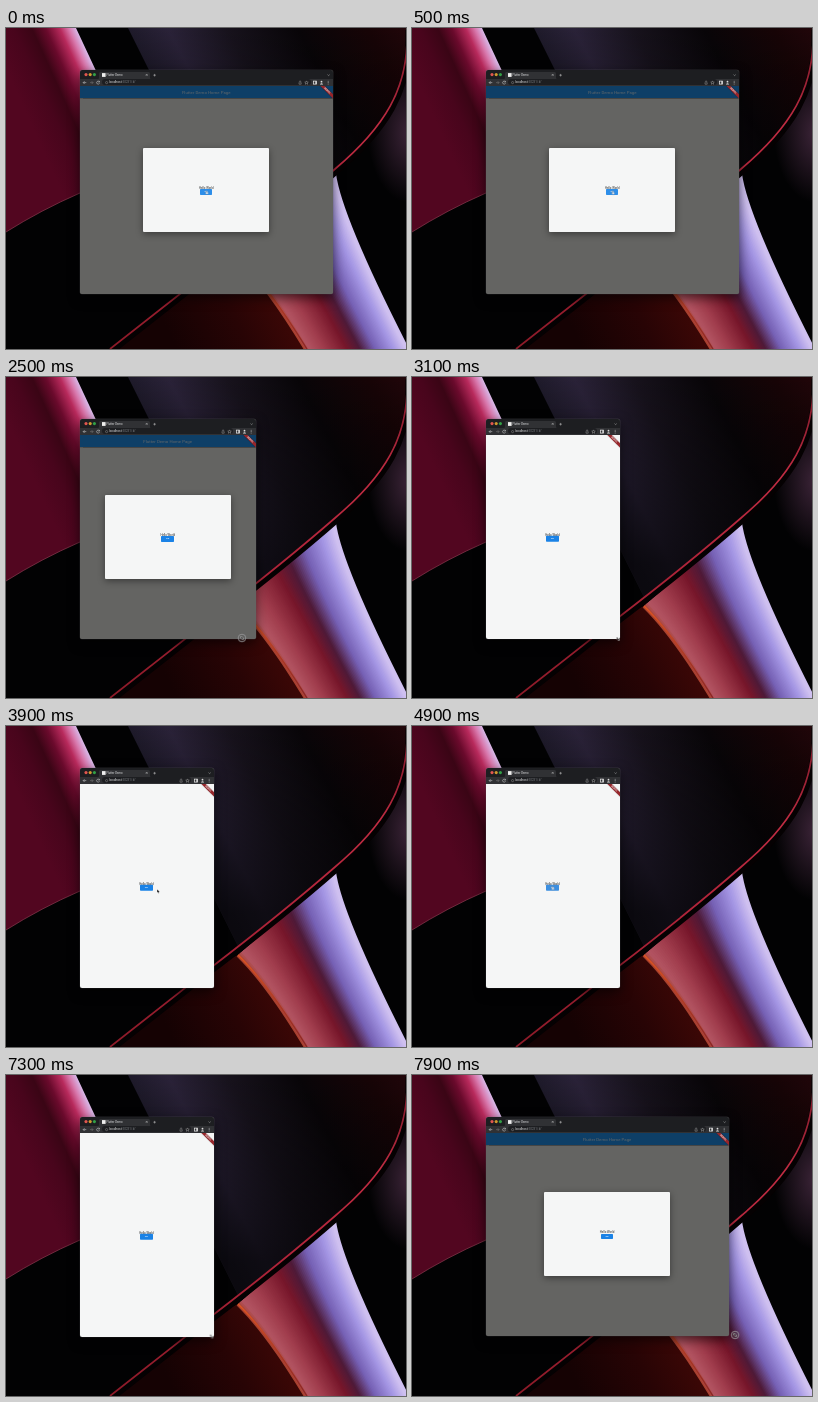
An HTML page for the animation above (8000 ms loop, 400 by 321 pixels).

```html
<!DOCTYPE html>
<html lang="en">
<head>
<meta charset="utf-8">
<title>Resizing a dialog</title>
<style>
html, body { margin: 0; width: 100%; height: 100%; overflow: hidden; background: #000; }
body { position: relative; font-family: Roboto, Arial, sans-serif; }
.wall { position: absolute; left: 0; top: 0; width: 400px; height: 321px; }

.window {
  position: absolute; left: 73.5px; top: 41.5px; width: 253.5px; height: 224.5px;
  border-radius: 2.5px; overflow: hidden; background: #646462;
  animation: resize 8s linear infinite;
}
.shade { overflow: visible; background: none; box-shadow: 0 4px 12px rgba(0,0,0,.6), 0 0 0 .5px rgba(120,120,125,.3); }
@keyframes resize {
  0%, 21.25% { width: 253.5px; height: 224.5px; }
  31.25% { width: 176.5px; height: 220.5px; }
  36.25%, 91.9% { width: 134px; height: 220.8px; }
  98.75% { width: 243px; height: 219.5px; }
  100% { width: 253px; height: 219.5px; }
}

.tabs { position: absolute; left: 0; right: 0; top: 0; height: 9px; background: #1d1e21; }
.bar { position: absolute; left: 0; right: 0; top: 9px; height: 7.2px; background: #303134; }
.pill { position: absolute; left: 22.5px; right: 22.5px; top: .9px; height: 5.4px; border-radius: 3px; background: #1d1e21; }
.url { position: absolute; left: 29.5px; top: 1.4px; font-size: 3.1px; line-height: 4.4px; color: #e4e5e7; white-space: nowrap; }
.url span { color: #777a7e; }
.tabs svg, .bar svg { position: absolute; top: 0; height: 9px; }
.tabs .left, .bar .left { left: 0; width: 90px; }
.tabs .right, .bar .right { right: 0; width: 40px; }
.tabs b { position: absolute; left: 27px; top: 3.5px; font: 2.8px/5px Roboto, Arial, sans-serif; color: #e6e7e9; white-space: nowrap; }

.page { position: absolute; left: 0; right: 0; top: 16.2px; bottom: 0; background: #646462; container-type: inline-size; overflow: hidden; }
.appbar {
  position: absolute; left: 0; right: 0; top: 0; height: 12.6px; background: #0e3f67;
  color: #63686b; font-size: 4.35px; line-height: 13.5px; text-align: center; white-space: nowrap;
  box-shadow: 0 .6px 1px rgba(0,0,0,.3);
}
.dialog {
  position: absolute; left: 50%; top: 50%; width: 126px; height: 84px; transform: translate(-50%, -50%);
  background: #f5f6f6; border-radius: 1px; box-shadow: 0 2px 7px rgba(0,0,0,.42);
  display: flex; flex-direction: column; align-items: center; justify-content: center;
}
@container (max-width: 160px) {
  .dialog { width: 100%; height: 100%; border-radius: 0; box-shadow: none; }
}
.dialog p { position: relative; top: .9px; margin: 0; font-size: 2.85px; line-height: 4.2px; color: #222; }
.dialog button {
  width: 12.4px; height: 5.8px; margin: 0; padding: 1px 0 0; border: 0; border-radius: .7px; box-sizing: border-box;
  background: #1a82e6; color: #fff; font: 500 2.5px/4.8px Roboto, Arial, sans-serif;
  animation: hover 8s step-end infinite;
}
@keyframes hover {
  0% { background: #2d8ee9; }
  7.5% { background: #1a82e6; }
  57.5% { background: #3c8fe0; }
  81.5%, 100% { background: #1a82e6; }
}
.banner {
  position: absolute; right: -6px; top: 3.2px; width: 24px; height: 3.2px; transform: rotate(45deg);
  background: #97262b; color: #f0e8e8; font: 700 2.4px/3.2px Roboto, Arial, sans-serif; text-align: center;
  box-shadow: 0 0 1px rgba(0,0,0,.4);
}

.cursor { position: absolute; left: 0; top: 0; width: 0; height: 0; animation: travel 8s ease-in-out infinite; }
.cursor svg { position: absolute; left: -6px; top: -6px; width: 12px; height: 12px; overflow: visible; }
@keyframes travel {
  0%, 6% { transform: translate(200.5px, 164px); }
  15%, 21.25% { transform: translate(329.5px, 267px); animation-timing-function: linear; }
  31.25% { transform: translate(236px, 261px); animation-timing-function: linear; }
  35.5%, 40% { transform: translate(206px, 262px); }
  47%, 50% { transform: translate(152px, 165px); }
  58%, 80% { transform: translate(140.5px, 161.5px); }
  88.75%, 91.3% { transform: translate(205.5px, 261.5px); animation-timing-function: linear; }
  98.75% { transform: translate(323px, 260px); animation-timing-function: linear; }
  100% { transform: translate(333px, 260px); }
}
.hand, .arrow, .grip, .ring { opacity: 0; animation: 8s step-end infinite; }
.hand { animation-name: hand; }
.arrow { animation-name: arrow; }
.grip { animation-name: grip; }
.ring { animation-name: ring; }
@keyframes hand { 0%, 57.5% { opacity: 1; } 7.5%, 81.5%, 100% { opacity: 0; } }
@keyframes arrow { 0%, 14.5%, 57.5%, 88%, 100% { opacity: 0; } 7.5%, 41%, 81.5% { opacity: 1; } }
@keyframes grip { 0%, 41%  { opacity: 0; } 14.5%, 88%, 100% { opacity: 1; } }
@keyframes ring { 0%, 37% { opacity: 0; } 20.5%, 91.9%, 100% { opacity: 1; } }
</style>
</head>
<body>
<svg class="wall" viewBox="0 0 400 321">
  <defs>
    <linearGradient id="crimson" gradientUnits="userSpaceOnUse" x1="6" y1="54" x2="79" y2="21">
      <stop offset="0" stop-color="#520620"/><stop offset=".3" stop-color="#48051c"/><stop offset=".5" stop-color="#3a0515"/>
      <stop offset=".66" stop-color="#6a0a2c"/><stop offset=".82" stop-color="#b82a5c"/><stop offset=".92" stop-color="#d878ac"/><stop offset="1" stop-color="#d8b4e4"/>
    </linearGradient>
    <linearGradient id="panel" gradientUnits="userSpaceOnUse" x1="122" y1="0" x2="343" y2="-116">
      <stop offset="0" stop-color="#1e1a2a"/><stop offset=".14" stop-color="#2a2238"/><stop offset=".35" stop-color="#17121c"/>
      <stop offset=".6" stop-color="#080508"/><stop offset=".85" stop-color="#170406"/><stop offset="1" stop-color="#22060a"/>
    </linearGradient>
    <linearGradient id="dusk" x1="0" y1="0" x2="0" y2="1">
      <stop offset="0" stop-color="#000" stop-opacity="0"/><stop offset=".85" stop-color="#000" stop-opacity=".65"/>
    </linearGradient>
    <radialGradient id="haze" gradientUnits="userSpaceOnUse" cx="404" cy="105" r="70" gradientTransform="translate(404 0) scale(.6 1) translate(-404 0)">
      <stop offset="0" stop-color="#3c2438"/><stop offset="1" stop-color="#020203"/>
    </radialGradient>
    <linearGradient id="ember" gradientUnits="userSpaceOnUse" x1="165" y1="310" x2="265" y2="262">
      <stop offset="0" stop-color="#150203"/><stop offset=".6" stop-color="#280405"/><stop offset="1" stop-color="#3a0706"/>
    </linearGradient>
    <linearGradient id="edge" x1="0" y1="0" x2="0" y2="1">
      <stop offset="0" stop-color="#e0561f"/><stop offset=".5" stop-color="#b03a22"/><stop offset="1" stop-color="#8a2424"/>
    </linearGradient>
    <linearGradient id="rim" gradientUnits="userSpaceOnUse" x1="104" y1="321" x2="400" y2="0">
      <stop offset="0" stop-color="#8c1a28"/><stop offset=".5" stop-color="#b0243a"/><stop offset=".8" stop-color="#c02c42"/><stop offset="1" stop-color="#7a1828"/>
    </linearGradient>
    <path id="sweep" d="M401 0V10C401 60 380 98 329 141C290 175 250 207 207 240L104 321"/>
  </defs>
  <rect width="400" height="321" fill="#020203"/>
  <path d="M0 0H70L140 150L74 165Q35 182 0 204Z" fill="url(#crimson)"/>
  <path d="M0 204Q35 182 74 165" fill="none" stroke="#8a3a50" stroke-width=".7"/>
  <path id="slab" d="M122 0H401V10C401 60 380 98 329 141C290 175 260 200 232 220Z" fill="url(#panel)"/>
  <path d="M122 0H401V10C401 60 380 98 329 141C290 175 260 200 232 220Z" fill="url(#dusk)"/>
  <path d="M401 10C401 60 380 98 329 141L400 300Z" fill="url(#haze)"/>
  <path d="M232 229Q262 258 301 321H104L207 240Z" fill="url(#ember)"/>
  <g id="cone" fill="none" stroke-width="4"></g>
  <path d="M232 229Q262 258 301 321" fill="none" stroke="url(#edge)" stroke-width="1.4"/>
  <g fill="none">
    <use href="#sweep" x="1.6" y="2" stroke="#050102" stroke-width="6.5"/>
    <use href="#sweep" stroke="url(#rim)" stroke-width="1.7"/>
  </g>
</svg>

<div class="window shade"></div>
<div class="window">
  <div class="tabs">
    <svg class="left" viewBox="0 0 90 9">
      <path d="M18 9Q19 9 19 7.5V3.5Q19 2 20.5 2H68.5Q70 2 70 3.5V7.5Q70 9 71 9Z" fill="#303134"/>
      <circle cx="6" cy="4.6" r="1.55" fill="#e2574f"/><circle cx="10.2" cy="4.6" r="1.55" fill="#d0982f"/><circle cx="14.4" cy="4.6" r="1.55" fill="#33a046"/>
      <rect x="22" y="3.1" width="3.6" height="3.8" fill="#eee"/>
      <path d="M65.8 4l1.8 1.8m0-1.8l-1.8 1.8M73.3 5.2h2.6m-1.3-1.3v2.6" stroke="#ccc" stroke-width=".5"/>
    </svg>
    <b>Flutter Demo</b>
    <svg class="right" viewBox="0 0 40 9"><path d="M34.5 4.6l1.1 1 1.1-1" fill="none" stroke="#bbb" stroke-width=".5"/></svg>
  </div>
  <div class="bar">
    <div class="pill"></div>
    <svg class="left" viewBox="0 0 90 9" fill="none" stroke="#d0d1d3" stroke-width=".55">
      <path d="M6.3 3.6H3.2m1.4-1.4L3.2 3.6 4.6 5"/>
      <path d="M10 3.6h3.1m-1.4-1.4l1.4 1.4L11.7 5" stroke="#777"/>
      <path d="M19.3 2.7a1.5 1.5 0 1 0 .2 1.5M19.5 1.9v1.2h-1.2"/>
      <circle cx="26.6" cy="3.6" r="1.1" stroke="#aaa" stroke-width=".4"/>
    </svg>
    <div class="url">localhost<span>:50231/#/</span></div>
    <svg class="right" viewBox="0 0 40 9" fill="none" stroke="#aaa" stroke-width=".45">
      <path d="M6 3.4v1.8h2.2V3.4M7.1 4.2V1.8m-.8.8l.8-.8.8.8"/>
      <path d="M13.5 1.9l.5 1.2 1.3.1-1 .8.3 1.3-1.1-.7-1.1.7.3-1.3-1-.8 1.3-.1z"/>
      <rect x="20.6" y="2.1" width="3" height="3" stroke="#eee" stroke-width=".7"/><path d="M22.9 2.1v3" stroke="#eee" stroke-width="1"/>
      <circle cx="28.5" cy="2.7" r=".9" fill="#ddd" stroke="none"/><path d="M26.8 5.4q1.7-2.4 3.4 0z" fill="#ddd" stroke="none"/>
      <path d="M35.2 1.9v3.6" stroke="#ddd" stroke-width=".7" stroke-dasharray=".7 .7"/>
    </svg>
  </div>
  <div class="page">
    <div class="appbar">Flutter Demo Home Page</div>
    <div class="dialog"><p>Hello World</p><button>OK</button></div>
    <div class="banner">DEBUG</div>
  </div>
</div>

<div class="cursor">
  <svg class="ring" viewBox="-6 -6 12 12"><circle r="3.8" fill="#555" fill-opacity=".3" stroke="#a5a5a8" stroke-width=".7"/></svg>
  <svg class="hand" viewBox="-6 -6 12 12"><path d="M-.5-1.2q.5-.5.8 0V0l1.2.4q.4.3.2.8L1.3 2.3H-.2L-1.2.8q.1-.5.7 0z" fill="#fff" stroke="#234" stroke-width=".25"/></svg>
  <svg class="arrow" viewBox="-6 -6 12 12"><path d="M-1-1.8V1.9L0 1.1.6 2.4l.7-.3L.8.8H2z" fill="#111" stroke="#fff" stroke-width=".4"/></svg>
  <svg class="grip" viewBox="-6 -6 12 12"><path d="M-1.5-1.5H.1L-.4-.9.9.4 1.5-.1v1.6H-.1l.5-.6L-.9-.4l-.6.5z" fill="#111" stroke="#ddd" stroke-width=".4"/></svg>
</div>

<script>
// The cone is a fan of curves blended between its left and right edges.
const left = [232, 229, 262, 258, 301, 323];
const right = [328, 146, 334, 190, 402, 323];
const stops = [
  [0, '#a8402e'], [.05, '#b25462'], [.2, '#a03c4c'], [.42, '#76162a'],
  [.55, '#4e1a38'], [.7, '#7560b4'], [.88, '#a496e4'], [1, '#cfc0f0']
];
const bands = 64;

function shade(t) {
  const i = Math.max(1, stops.findIndex(([at]) => at >= t));
  const [a, from] = stops[i - 1], [b, to] = stops[i];
  return `color-mix(in srgb, ${to} ${100 * (t - a) / (b - a)}%, ${from})`;
}

for (let i = 0; i <= bands; i++) {
  const t = i / bands;
  const [x, y, cx, cy, ex, ey] = left.map((v, k) => v + (right[k] - v) * t);
  const band = document.createElementNS('http://www.w3.org/2000/svg', 'path');
  band.setAttribute('d', `M${x} ${y}Q${cx} ${cy} ${ex} ${ey}`);
  band.style.stroke = shade(t);
  document.getElementById('cone').append(band);
}
</script>
</body>
</html>
```
